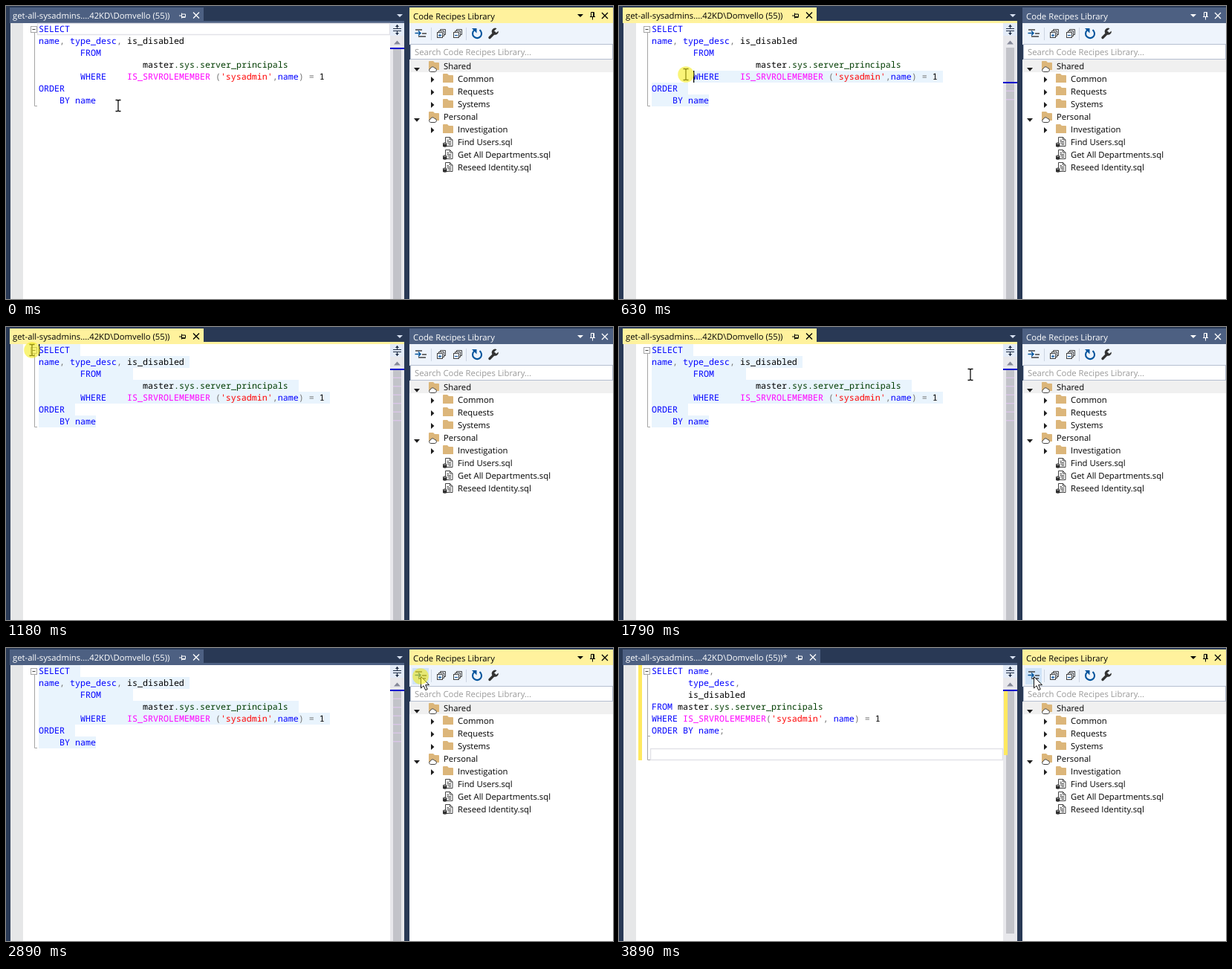
Recreate the animation shown at these times as an HTML page. Size 817x394 px, loop 4.28 s.

```html
<!DOCTYPE html>
<html lang="en">
<head>
<meta charset="utf-8">
<title>Format selection</title>
<style>
html, body { margin: 0; width: 100%; height: 100%; overflow: hidden; background: #293955; }
svg {
  display: block; width: 817px; height: 394px;
  --tab: #4d6082; --tab-ink: #fff; --title: #fff29d; --title-ink: #000;
}
svg.editing { --tab: #fff29d; --tab-ink: #000; --title: #4d6082; --title-ink: #fff; }
text { font: 11.3px "Open Sans", "Noto Sans", sans-serif; text-rendering: geometricPrecision; white-space: pre; fill: #000; }
.code text { font: 11.667px "Noto Sans Mono", "DejaVu Sans Mono", monospace; }
.k { fill: #00f; } .f { fill: #f0f; } .s { fill: #f00; } .o { fill: #777; } .g { fill: #003c00; }
.tab { fill: var(--tab); }
.title { fill: var(--title); }
.tab-ink { fill: var(--tab-ink); }
.title-ink { fill: var(--title-ink); }
.tab-line { stroke: var(--tab-ink); fill: none; }
.title-line { stroke: var(--title-ink); fill: none; }
.fold { stroke: #a5a5a5; fill: none; }
.hover { fill: #cfe3f8; }
.hidden { visibility: hidden; }
</style>
</head>
<body>
<svg id="stage" viewBox="0 0 817 394">
  <defs>
    <path id="cross" d="M-4-4L4 4M4-4L-4 4" stroke-width="1.3"/>
    <path id="pin" d="M-4 0H-1M-.5-3.5V3.5M0-2H4.5V1.5H0M0 2.3H4.5"/>
    <path id="folder" d="M0 1Q0 0 1 0H6L8 2H13Q14 2 14 3V12H0Z" fill="#dcb67a"/>
    <g id="cloud-folder">
      <use href="#folder"/>
      <path d="M2.5 14.5A2.3 2.3 0 0 1 2.4 10A2.9 2.9 0 0 1 7.8 9.4A2.6 2.6 0 0 1 8.5 14.5Z" fill="#fff" stroke="#424242"/>
    </g>
    <g id="script">
      <path d="M3.5.5H9.5L13 4V12.5H3.5Z" fill="#fff" stroke="#424242"/>
      <path d="M9.5.5V4H13M5.5 4.5H8M5.5 6.5H11M6.5 8.5H11M7.5 10.5H11" stroke="#424242" fill="none"/>
      <path d="M0 8.3Q2.7 6.8 5.4 8.3V13Q2.7 14.4 0 13Z" fill="#303030"/>
      <path d="M.8 8.8Q2.7 9.8 4.6 8.8" stroke="#fff" stroke-width=".7" fill="none"/>
    </g>
    <path id="open" d="M-4-2H4L0 2.8Z" fill="#1e1e1e"/>
    <path id="shut" d="M-2-4V4L2.4 0Z" fill="#1e1e1e"/>
    <g id="boxes" fill="#eef4fc" stroke="#424242">
      <path d="M4.5-4.5V-6.5H11.5V.5H9.5" fill="none"/>
      <path d="M2.5-2.5V-4.5H9.5V2.5H7.5" fill="none"/>
      <rect x=".5" y="-2.5" width="7" height="7"/>
    </g>
  </defs>

  <rect width="817" height="394" fill="#293955"/>

  <!-- editor -->
  <rect id="tab" class="tab" x="5" y="2" width="261" height="19"/>
  <rect class="tab" x="5" y="20" width="531" height="3"/>
  <text id="tabText" class="tab-ink" x="9" y="17"></text>
  <g id="tabIcons" class="tab-line">
    <use href="#pin" x="237" y="13"/>
    <use href="#cross" x="256" y="12.5"/>
  </g>
  <path d="M526 11H534L530 15Z" fill="#d6dff0"/>
  <rect x="6" y="23" width="511" height="371" fill="#fff"/>
  <rect x="6" y="23" width="17" height="371" fill="#e6e7e8"/>
  <rect id="current" x="42.5" y="23.5" width="474" height="15" fill="none" stroke="#e2e2e8" stroke-width="1.5"/>
  <g id="selection" fill="#e9f4fd"></g>
  <g id="before" class="code"></g>
  <g id="after" class="code">
    <rect x="26" y="23" width="5" height="128" fill="#ffe95f"/>
  </g>
  <g id="foldBefore" class="fold"><path d="M38.5 36V134.5H42"/></g>
  <g id="foldAfter" class="fold"><path d="M38.5 36V150.5H42M38 118.5H42"/></g>
  <g id="foldBox" class="fold"><rect x="33.5" y="27.5" width="8" height="8" fill="#fff"/><path d="M35.5 31.5H39.5" stroke="#444"/></g>
  <rect id="caret" y="23" width="1.3" height="16"/>

  <!-- scroll bar -->
  <rect x="517" y="23" width="19" height="371" fill="#e8e8ec"/>
  <rect x="517" y="23" width="19" height="17" fill="#e3ebf8"/>
  <path d="M521 30.5H532M521 33.5H532M526.5 25V30M526.5 34V39" stroke="#1e2c45"/>
  <path d="M524 28L526.5 25L529 28ZM524 36L526.5 39L529 36Z" fill="#1e2c45"/>
  <path d="M522 51.5L526.5 46.5L531 51.5Z" fill="#868999"/>
  <rect id="thumb" x="521" y="56" width="11" height="338" fill="#c2c3c9"/>
  <g id="marks" fill="#d9c6e6"></g>
  <rect id="changed" x="518" y="57" width="5" height="87" fill="#ffe95f"/>
  <rect id="caretMark" x="517" y="56" width="19" height="2" fill="#0000cd"/>

  <!-- explorer -->
  <rect class="title" x="543" y="2" width="274" height="21"/>
  <text class="title-ink" x="548" y="18">Code Recipes Library</text>
  <path class="title-ink" d="M769 11H777L773 15Z"/>
  <g class="title-line">
    <path d="M786 14.5H793M787.5 14V8.5H791.5V14M790.7 9V14M789.5 15V18.5"/>
    <use href="#cross" x="806" y="13"/>
  </g>
  <rect x="543" y="23" width="274" height="29" fill="#eef4fc"/>
  <rect id="hoverFormat" class="hover" x="547" y="27" width="22" height="22"/>
  <rect id="hoverExpand" class="hover" x="575" y="27" width="20" height="22"/>
  <path d="M551 32H560M555 41H565M560 37H566" stroke="#424242" stroke-width="1.4"/>
  <path d="M550.5 36.5H557.5M555 33.5L558 36.5L555 39.5" stroke="#00539c" stroke-width="1.4" fill="none"/>
  <path d="M572.5 29V46M619.5 29V46" stroke="#cdd5e2"/>
  <use href="#boxes" x="580" y="38"/>
  <path d="M582 39.5H586M584 37.5V41.5" stroke="#00539c"/>
  <use href="#boxes" x="602" y="38"/>
  <path d="M604 39.5H608" stroke="#00539c"/>
  <path d="M630.2 32.5A6 6 0 1 0 637.5 32.2" fill="none" stroke="#00539c" stroke-width="2.1"/>
  <path d="M627 30H633.5V36.5Z" fill="#00539c"/>
  <path d="M651 42.5L657.5 36" stroke="#333" stroke-width="3.4" stroke-linecap="round"/>
  <path d="M660.5 30.2A4.6 4.6 0 1 0 662.8 33.5L659.8 36L657 33.4Z" fill="#333"/>
  <rect x="543" y="72" width="274" height="322" fill="#fff"/>
  <rect x="543" y="72" width="274" height="17" fill="#f0f0f0"/>
  <rect x="544.5" y="51.5" width="272" height="20" fill="#fff" stroke="#b5bfd0"/>
  <text x="550" y="66" style="fill:#9a9a9a">Search Code Recipes Library...</text>
  <g id="tree"></g>

  <g id="tip">
    <rect x="463.5" y="59.5" width="102" height="24" fill="#e9ebf3" stroke="#8b94a6"/>
    <text x="470" y="76">Format Selection</text>
  </g>

  <g id="pointer">
    <path id="beam" d="M-3.5-7.5H-1L0-6.5L1-7.5H3.5M0-6.5V6.5M-3.5 7.5H-1L0 6.5L1 7.5H3.5" fill="none" stroke="#111" stroke-width="1.3"/>
    <path id="arrow" d="M.5.5V16L4 12.7L6.7 18.6L9.2 17.5L6.6 11.7H11.5Z" fill="#fff" stroke="#111"/>
    <circle id="press" r="10.8" fill="#f4ec14" opacity=".58"/>
  </g>
</svg>
<script>
const LOOP = 4280, LEFT = 44, TOP = 23, ROW = 16, CHAR = 7, TAB = 28;
const PRESS = 390, RELEASE = 1470, ARROW = 1960, TIP = 2660, CLICK = 2890, CLICK_END = 3030, FORMAT = 3110, REFOLD = 3890;
const $ = id => document.getElementById(id);

function add(parent, tag, attrs, html = "") {
  const el = document.createElementNS("http://www.w3.org/2000/svg", tag);
  for (const key in attrs) el.setAttribute(key, attrs[key]);
  el.innerHTML = html;
  return parent.appendChild(el);
}

const paint = cls => s => `<tspan class="${cls}">${s}</tspan>`;
const k = paint("k"), o = paint("o");
const name = k("name"), comma = o(",");
const table = "master" + paint("g")(".sys.server_principals");
const role = paint("f")("IS_SRVROLEMEMBER"), admin = paint("s")("'sysadmin'");

// lines are [column, markup]
function code(id, lines) {
  lines.forEach(([col, html], i) =>
    add($(id), "text", { x: LEFT + col * CHAR, y: 35 + i * ROW }, html));
}
code("before", [
  [0, k("SELECT")],
  [0, `${name}${comma} ${k("type_desc")}${comma} is_disabled`],
  [8, k("FROM")],
  [20, table],
  [8, `${k("WHERE")}    ${role} ${o("(")}${admin}${comma}${name}${o(")")} ${o("=")} 1`],
  [0, k("ORDER")],
  [4, `${k("BY")} ${name}`]
]);
code("after", [
  [0, `${k("SELECT")} ${name}${comma}`],
  [7, k("type_desc") + comma],
  [7, "is_disabled"],
  [0, `${k("FROM")} ${table}`],
  [0, `${k("WHERE")} ${role}${o("(")}${admin}${comma} ${name}${o(")")} ${o("=")} 1`],
  [0, `${k("ORDER")} ${k("BY")} ${name}${o(";")}`]
]);

[["Shared", "root"], ["Common", "folder"], ["Requests", "folder"], ["Systems", "folder"],
 ["Personal", "root"], ["Investigation", "folder"],
 ["Find Users.sql", "script"], ["Get All Departments.sql", "script"], ["Reseed Identity.sql", "script"]
].forEach(([label, kind], i) => {
  const y = 81 + i * 17, root = kind === "root", tree = $("tree");
  if (root) add(tree, "use", { href: "#open", x: 553, y: y + 4 });
  if (kind === "folder") add(tree, "use", { href: "#shut", x: 574, y: y + 1 });
  add(tree, "use", { href: root ? "#cloud-folder" : "#" + kind, x: root ? 569 : 588, y: y - 7 });
  add(tree, "text", { x: root ? 589 : 608, y: y + 4 }, label);
});

// per code line: leading tabs and end of text
const indents = [0, 0, 2, 5, 2, 0, 1];
const ends = [93, 240, 164, 387, 429, 86, 121];
const rows = ends.map((_, i) => add($("selection"), "rect", { y: TOP + i * ROW, height: ROW }));
const marks = ends.map((_, i) => add($("marks"), "rect", { x: 521, y: 56 + i * 11.5, width: 11, height: 1.5 }));

// time, x, y
const path = [
  [0, 151, 134], [310, 144, 132], [390, 130, 129], [470, 116, 121], [550, 101, 105],
  [630, 90, 92], [710, 81, 81], [780, 72, 70], [860, 64, 58], [940, 57, 48],
  [1020, 50, 41], [1100, 42, 35], [1180, 35, 31], [1240, 32, 27], [1320, 30, 24],
  [1470, 30, 24], [1550, 110, 38], [1630, 250, 54], [1710, 385, 63], [1790, 473, 64],
  [1880, 528, 56], [1960, 557, 46], [2030, 576, 44], [2110, 583, 43], [2190, 575, 41],
  [2270, 563, 39], [2340, 558, 38]
];
const poseAt = t => path.filter(p => p[0] <= t).pop();

function caretAt(t) {
  if (t < PRESS) return { line: 0, x: LEFT };
  const [, x, y] = poseAt(Math.min(t, RELEASE - 1));
  const line = Math.max(0, Math.min(6, Math.floor((y - TOP) / ROW)));
  const step = x < LEFT + indents[line] * TAB ? TAB : CHAR;
  const snapped = LEFT + Math.round((x - LEFT) / step) * step;
  return { line, x: Math.max(LEFT, Math.min(ends[line], snapped)) };
}

const show = (id, on) => $(id).classList.toggle("hidden", !on);
const within = (t, a, b) => t >= a && t < b;

function draw(t) {
  const done = t >= FORMAT, [, x, y] = poseAt(t), caret = caretAt(t);
  const arrow = t >= ARROW, selecting = within(t, PRESS, FORMAT);
  $("stage").classList.toggle("editing", within(t, PRESS, CLICK));

  $("tabText").textContent = "get-all-sysadmins....42KD\\Domvello (55))" + (done ? "*" : "");
  $("tab").setAttribute("width", done ? 266 : 261);
  $("tabIcons").setAttribute("transform", `translate(${done ? 5 : 0})`);

  rows.forEach((row, i) => {
    const from = i === caret.line ? caret.x : LEFT;
    const to = ends[i] + (i < 6 ? CHAR : 0);
    row.setAttribute("x", from);
    row.setAttribute("width", selecting && i >= caret.line ? to - from : 0);
    marks[i].classList.toggle("hidden", !selecting || i <= caret.line);
  });
  $("caret").setAttribute("x", caret.x);
  $("caret").setAttribute("y", TOP + caret.line * ROW);
  show("caret", within(t, PRESS, 1630) || within(t, 2110, TIP));
  $("caretMark").setAttribute("y", 56 + (done ? 0 : caret.line * 11.5));
  $("current").setAttribute("y", TOP + 0.5 + (done ? 7 : caret.line) * ROW);
  show("current", t < 470 || done);

  show("before", !done);
  show("after", done);
  show("changed", done);
  show("foldBefore", !done);
  show("foldAfter", t >= REFOLD);
  show("foldBox", !done || t >= REFOLD);
  $("thumb").setAttribute("height", done ? 328 : 338);

  show("hoverFormat", arrow && x < 570);
  show("hoverExpand", arrow && x >= 575);
  show("tip", within(t, TIP, CLICK));
  show("press", within(t, PRESS, RELEASE) || within(t, CLICK, CLICK_END));
  show("beam", !arrow);
  show("arrow", arrow);
  $("pointer").setAttribute("transform", `translate(${x} ${y})`);
}

const start = performance.now();
function tick() {
  draw((performance.now() - start) % LOOP);
  requestAnimationFrame(tick);
}
tick();
</script>
</body>
</html>
```
